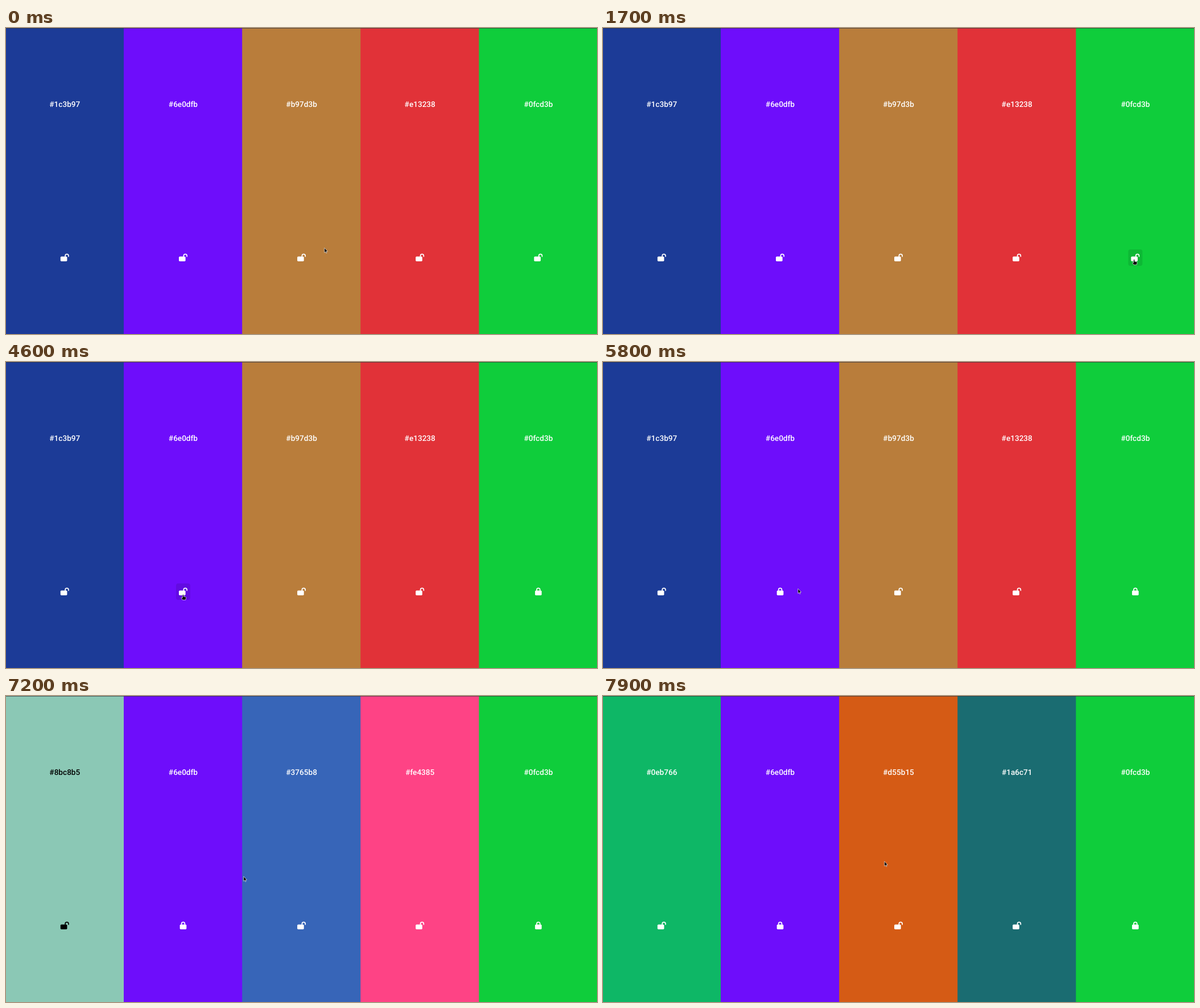
Write an HTML page that moves like this. It is 1039 px wide and 539 px high and loops after 8 s.

```html
<!DOCTYPE html>
<html lang="en">
<head>
<meta charset="utf-8">
<title>Color palette</title>
<style>
  html, body { margin: 0; width: 100%; height: 100%; overflow: hidden; }
  svg { display: block; width: 1039px; height: 539px; }
  text { font: 500 13.6px Roboto, sans-serif; text-anchor: middle; text-rendering: geometricPrecision; }
</style>
</head>
<body>
<svg id="stage" viewBox="0 0 1039 539"></svg>
<script>
const LOOP = 8000, STEP = 100, PITCH = 208.14;
const stage = document.getElementById('stage');

const palettes = [
  { from: 0, colors: ['#1c3b97', '#6e0dfb', '#b97d3b', '#e13238', '#0fcd3b'] },
  { from: 6200, colors: ['#8bc8b5', '#6e0dfb', '#3765b8', '#fe4385', '#0fcd3b'] },
  { from: 7400, colors: ['#0eb766', '#6e0dfb', '#d55b15', '#1a6c71', '#0fcd3b'] }
];
const lockTimes = { 4: 3100, 1: 5000 }; // column: time it is locked

// pointer strokes; "via" bends a stroke towards a control point
const home = [560, 387];
const moves = [
  { from: 300, until: 1200, to: [939, 399], via: [313, 29] },
  { from: 1200, until: 1400, to: [934, 407] },
  { from: 2200, until: 2300, to: [935, 406] },
  { from: 3200, until: 4100, to: [319, 400], via: [627, 443] },
  { from: 4100, until: 4600, to: [311.5, 409] },
  { from: 5300, until: 5800, to: [343, 399] },
  { from: 6100, until: 7000, to: [432, 319], via: [371, 382] },
  { from: 7000, until: 7200, to: [418, 317.5] },
  { from: 7500, until: 7900, to: [495, 291] }
];

function pointerAt(t) {
  let pos = home;
  for (const { from, until, to, via } of moves) {
    if (t <= from) break;
    const k = Math.min(1, (t - from) / (until - from));
    pos = pos.map((a, i) => {
      const b = to[i], c = via ? via[i] : (a + b) / 2;
      return a * (1 - k) ** 2 + 2 * c * k * (1 - k) + b * k * k;
    });
  }
  return pos;
}

function isDark(hex) {
  const n = parseInt(hex.slice(1), 16);
  return (n >> 16) * 0.299 + (n >> 8 & 255) * 0.587 + (n & 255) * 0.114 < 170;
}

function padlock(cx, color, locked) {
  const left = locked ? 112 : 320;
  const x = cx - (locked ? 5.8 : 7.5);
  return `<g transform="translate(${x} 397.6) scale(.026)">
    <rect y="192" width="448" height="320" rx="64" fill="${color}"/>
    <path d="M${left} 224V144a112 112 0 0 1 224 0v48" fill="none"
      stroke="${color}" stroke-width="64" stroke-linecap="round"/></g>`;
}

const arrow = 'M0 0V8.3L1.9 6.7L3 9.3L4.3 8.8L3.2 6.2L5.6 6Z';
const hand = 'M-1 .9Q0-.6 1 .9V3.8L4.4 4.5Q5.4 4.8 5.2 6L4.4 9.8H-.8L-3 6.6Q-3.2 5.4-2 5.6L-1 6.4Z';

function draw(t) {
  const { colors } = palettes.findLast(p => p.from <= t);
  const [px, py] = pointerAt(t);
  let overButton = false;
  let out = '';
  colors.forEach((color, i) => {
    const cx = 103.3 + PITCH * i, ink = isDark(color) ? '#fff' : '#000';
    const locked = t >= lockTimes[i];
    const bx = cx - 12.5;
    out += `<rect x="${PITCH * i - 1.14}" width="210" height="539" fill="${color}"/>`;
    if (px > bx && px < bx + 25 && py > 390 && py < 419) {
      overButton = true;
      out += `<rect x="${bx}" y="390" width="25" height="29" rx="4" fill-opacity="${locked ? 0.05 : 0.1}"/>`;
    }
    out += `<text x="${cx}" y="139.3" fill="${ink}">${color}</text>` + padlock(cx, ink, locked);
  });
  out += `<rect width="1039" height="1" fill="#30343c" fill-opacity=".7"/>
    <path transform="translate(${px - 0.2} ${py + 0.3})" d="${overButton ? hand : arrow}"
      stroke="#fff" stroke-opacity=".8" stroke-width=".8" stroke-linejoin="round"/>`;
  stage.innerHTML = out;
}

const start = performance.now();
let shown = -1;
function tick() {
  const t = Math.floor((performance.now() - start) % LOOP / STEP) * STEP;
  if (t !== shown) draw(shown = t);
  requestAnimationFrame(tick);
}
tick();
</script>
</body>
</html>
```
